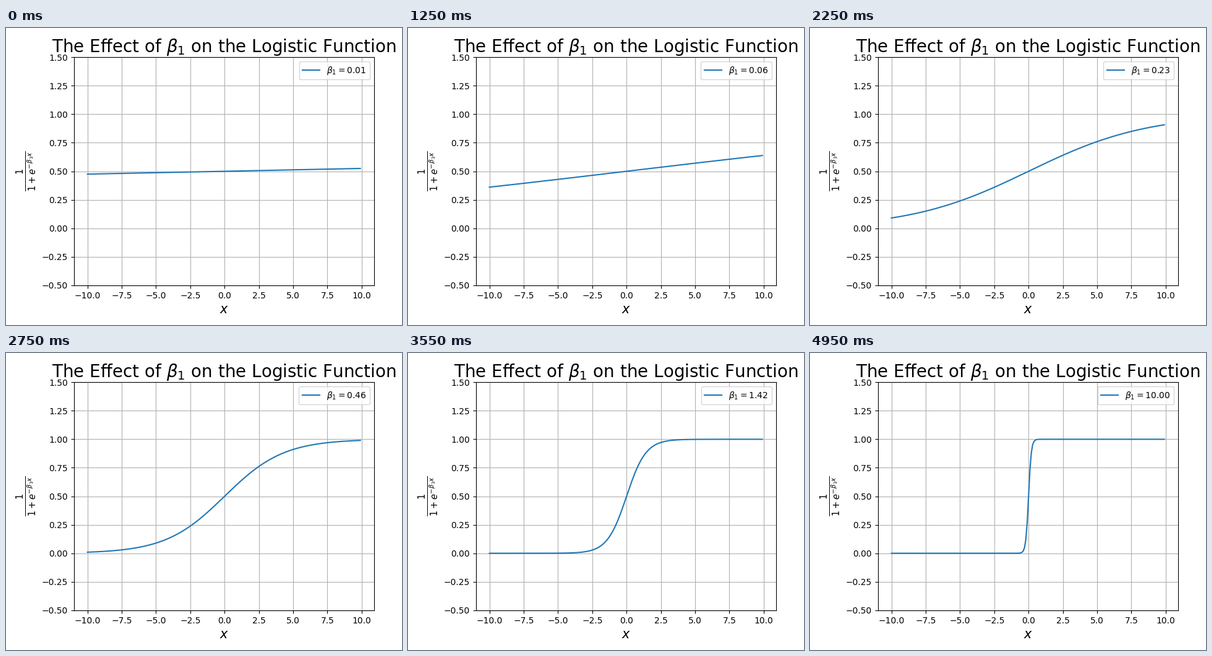
A matplotlib script for the animation above (5 s loop, 640x480 px).

```python
import numpy as np
import matplotlib.pyplot as plt
from matplotlib.animation import FuncAnimation

W, H, DPI = 640, 480, 100
FRAMES, INTERVAL = 100, 50

plt.rcParams["font.family"] = "DejaVu Sans"

x = np.arange(-10, 10, 0.1)
betas = np.logspace(-2, 1, FRAMES)

fig, ax = plt.subplots(figsize=(W / DPI, H / DPI), dpi=DPI)
fig.subplots_adjust(left=109.54 / W, right=594.7 / W,
                    bottom=1 - 415.8 / H, top=1 - 47.3 / H)

line, = ax.plot(x, np.full_like(x, 0.5), color="C0", lw=1.5)
margin = 0.05 * (x[-1] - x[0])
ax.set_xlim(x[0] - margin, x[-1] + margin)
ax.set_ylim(-0.5, 1.5)
ax.grid(True)
ax.set_title(r"The Effect of $\beta_1$ on the Logistic Function", fontsize=20)
ax.set_xlabel(r"$x$", fontsize=15)
ax.set_ylabel(r"$\frac{1}{1+e^{-\beta_1x}}$", fontsize=15)


def update(i):
    beta = betas[i]
    line.set_ydata(1 / (1 + np.exp(-beta * x)))
    line.set_label(rf"$\beta_1={beta:.2f}$")
    legend = ax.legend(loc="upper right")
    return line, legend


anim = FuncAnimation(fig, update, frames=FRAMES, interval=INTERVAL,
                     init_func=lambda: update(0), repeat=True, repeat_delay=0)
plt.show()
```
